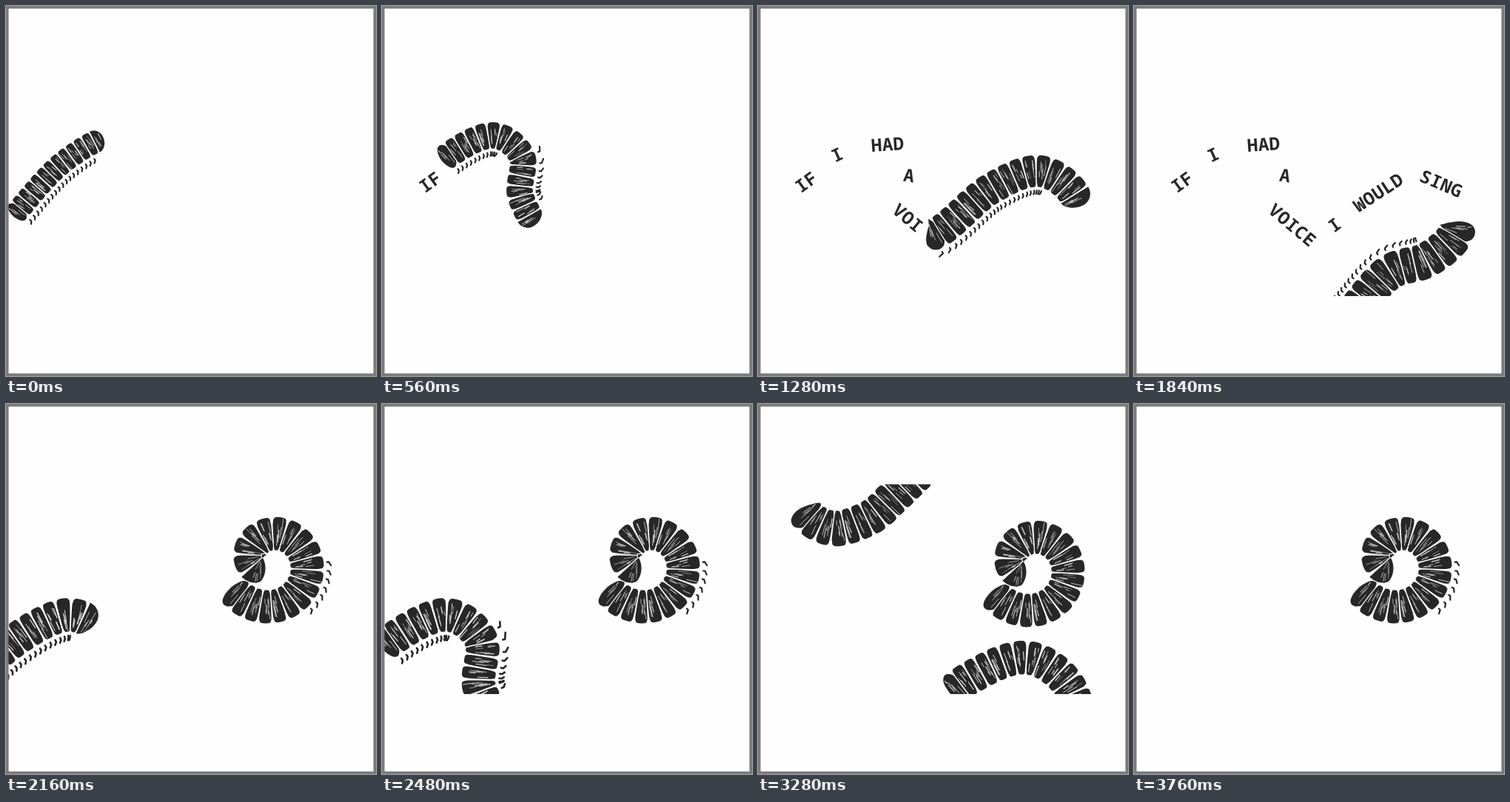
An HTML page with a canvas for the animation above (3840 ms loop, 500 px wide and 500 px high).

```html
<!DOCTYPE html>
<html>
<head>
<meta charset="utf-8">
<style>
html, body { margin: 0; width: 100%; height: 100%; overflow: hidden; background: #fefefe; }
canvas { display: block; width: 500px; height: 500px; }
</style>
</head>
<body>
<canvas id="stage" width="500" height="500"></canvas>
<script>
const ctx = document.getElementById('stage').getContext('2d');
const LOOP = 3840, STEP = 80, INK = '#272727', PAPER = '#fefefe';
const rand = (i, j) => { const x = Math.sin(i * 12.99 + j * 78.23) * 43758.5; return x - Math.floor(x); };

// Smooth curve through key points, addressed by arc length and sideways offset.
function curve(...knots) {
  const dots = [];
  let last = knots[0], left = 1;
  for (let i = 0; i < knots.length - 1; i++) {
    const [a, b, c, d] = [-1, 0, 1, 2].map(n => knots[Math.min(knots.length - 1, Math.max(0, i + n))]);
    for (let f = 0; f < 1; f += 1 / 256) {
      const p = [0, 1].map(n => b[n] + f / 2 * (c[n] - a[n] +
        f * (2 * a[n] - 5 * b[n] + 4 * c[n] - d[n] + f * (3 * (b[n] - c[n]) + d[n] - a[n]))));
      left += Math.hypot(p[0] - last[0], p[1] - last[1]);
      if (left >= 1) { dots.push(p); left--; }
      last = p;
    }
  }
  const at = (s, side = 0) => {
    const i = Math.min(dots.length - 4, Math.max(3, Math.floor(s)));
    const [ax, ay] = dots[i - 3], [bx, by] = dots[i + 3], len = Math.hypot(bx - ax, by - ay);
    const dx = (bx - ax) / len, dy = (by - ay) / len, more = s - i;
    return [dots[i][0] + dx * more - dy * side, dots[i][1] + dy * more + dx * side];
  };
  at.size = dots.length;
  return at;
}

const trail = curve([11, 283], [75, 213], [146, 175], [189, 203], [188, 260], [232, 310], [313, 248],
  [378, 223], [425, 251], [437, 303], [398, 342], [345, 360], [300, 410]);
const valley = curve([46, 60], [60, 140], [100, 168], [150, 154], [182, 127], [225, 85]);
const coil = curve(...Array.from({ length: 30 }, (_, i) => {
  const turn = -0.62 + i * 0.14, angle = (1 - turn) * Math.PI / 2;
  const r = 57 * (1 - turn * Math.abs(turn) / 14);
  return [354 + r * Math.cos(angle), 217 + r * Math.sin(angle)];
}));

// Leg ranges: from, to, side (1 is right of heading).
const trailLegs = [[0, 195, 1], [225, 300, -1], [345, 545, 1], [700, 900, 1]];
const coilLegs = [[95, 150, 1]];

function line(points, width, color) {
  ctx.beginPath();
  points.forEach(p => ctx.lineTo(...p));
  ctx.lineWidth = width;
  ctx.strokeStyle = color;
  ctx.stroke();
}

function segment(path, mid, half, width, i, kind) {
  const at = (u, v) => path(mid + u * half, v * width / 2);
  const soft = x => Math.sign(x) * Math.abs(x) ** 0.4;
  ctx.beginPath();
  for (let n = 0; n < 36; n++) {
    const a = n * Math.PI / 18, x = Math.cos(a), y = Math.sin(a);
    if (kind === 'tail') ctx.lineTo(...at(x * 1.5, y));
    else if (kind === 'head') ctx.lineTo(...at(x > 0 ? x * 2.5 - 1 : -1, y));
    else ctx.lineTo(...at(soft(x), soft(y)));
  }
  ctx.closePath();
  ctx.lineWidth = 2.5;
  ctx.strokeStyle = PAPER;
  ctx.stroke();
  ctx.fillStyle = INK;
  ctx.fill();
  for (let j = 0; j < 7; j++) {
    const u = (rand(i, j) - 0.5) * 1.5, v = rand(i, j + 9) * 1.1 - 0.75, reach = 0.2 + rand(i, j + 20) * 0.5;
    line([at(u, v), at(u + 0.1, v + reach)], 0.4 + rand(i, j + 30) * 0.7, '#d8d8d8');
  }
}

function millipede(path, tail, length, width, pitch, legs = []) {
  const count = Math.round(length / pitch), gap = length / count;
  for (let s = tail + 8; s < tail + length - 20; s += 7.5) {
    const range = legs.find(([from, to]) => s >= from && s <= to);
    if (!range) continue;
    const side = n => range[2] * (width / 2 + n);
    line([path(s + 1, side(4.5)), path(s + 1, side(7)), path(s - 2, side(9.5))], 2.2, INK);
  }
  for (let i = 0; i < count; i++)
    segment(path, tail + (i + 0.5) * gap, gap / 2 - 0.9, width, i,
      i === 0 ? 'tail' : i === count - 1 ? 'head' : '');
}

// Word, centre, angle in degrees
const words = [['IF', 65, 238, -36], ['I', 107, 201, -25], ['HAD', 175, 187, -4], ['A', 204, 229, 8],
  ['VOICE', 214, 296, 40], ['I', 271, 296, -36], ['WOULD', 330, 252, -33], ['SING', 415, 240, 23]];
const letters = words.flatMap(([word, x, y, deg]) => [...word].map((char, i) => {
  const turn = deg * Math.PI / 180, off = (i - (word.length - 1) / 2) * 15;
  const px = x + off * Math.cos(turn), py = y + off * Math.sin(turn);
  let near = 0, best = Infinity;
  for (let s = 0; s < 660; s++) {
    const [cx, cy] = trail(s), dist = Math.hypot(cx - px, cy - py);
    if (dist < best) { best = dist; near = s; }
  }
  return { char, px, py, turn, near };
}));

// Each letter appears once the tail has passed it.
function write(tail) {
  ctx.font = '600 24px "Noto Sans Mono", "DejaVu Sans Mono", monospace';
  ctx.textAlign = 'center';
  ctx.fillStyle = INK;
  for (const { char, px, py, turn, near } of letters) {
    if (tail < near + 8) continue;
    ctx.save();
    ctx.translate(px, py);
    ctx.rotate(turn);
    ctx.fillText(char, 0, 8.5);
    ctx.restore();
  }
}

function placed(x, y, scale, paint) {
  ctx.save();
  ctx.translate(x, y);
  ctx.scale(scale, scale);
  paint();
  ctx.restore();
}

function draw(time) {
  const step = Math.max(0, Math.floor(time % LOOP / STEP) - 1);
  const tail = 13 * step + 0.72 * step ** 2;
  ctx.fillStyle = PAPER;
  ctx.fillRect(0, 0, 500, 500);
  ctx.lineCap = ctx.lineJoin = 'round';
  ctx.save();
  ctx.beginPath();
  ctx.rect(3, 108.5, 473, 283.5);
  ctx.clip();
  if (step < 25) write(tail);
  else {
    const swing = Math.floor((step - 30) / 2) & 1;
    placed(swing * 12, swing * 5, 1, () =>
      millipede(coil, 0, coil.size, 45, 15, swing ? [] : coilLegs));
  }
  if (step < 32)
    millipede(trail, tail, 160 + 100 * (1 - Math.exp(-step / 6)), 31 + 0.8 * step, 12.6 + 0.2 * step, trailLegs);
  if (step > 22) {
    placed(-93, 75, 1.2, () =>
      millipede(trail, 99 + 34 * (step - 30), 245, 38, 13.5, trailLegs.slice(0, 2)));
    millipede(valley, 84 + 40 * (step - 40), 260, 48, 16.5);
  }
  ctx.restore();
  ctx.lineJoin = 'miter';
  ctx.lineWidth = 3.5;
  ctx.strokeStyle = '#7b7b7b';
  ctx.strokeRect(1.75, 1.75, 496.5, 496.5);
}

function tick() {
  draw(performance.now());
  requestAnimationFrame(tick);
}
tick();
</script>
</body>
</html>
```
